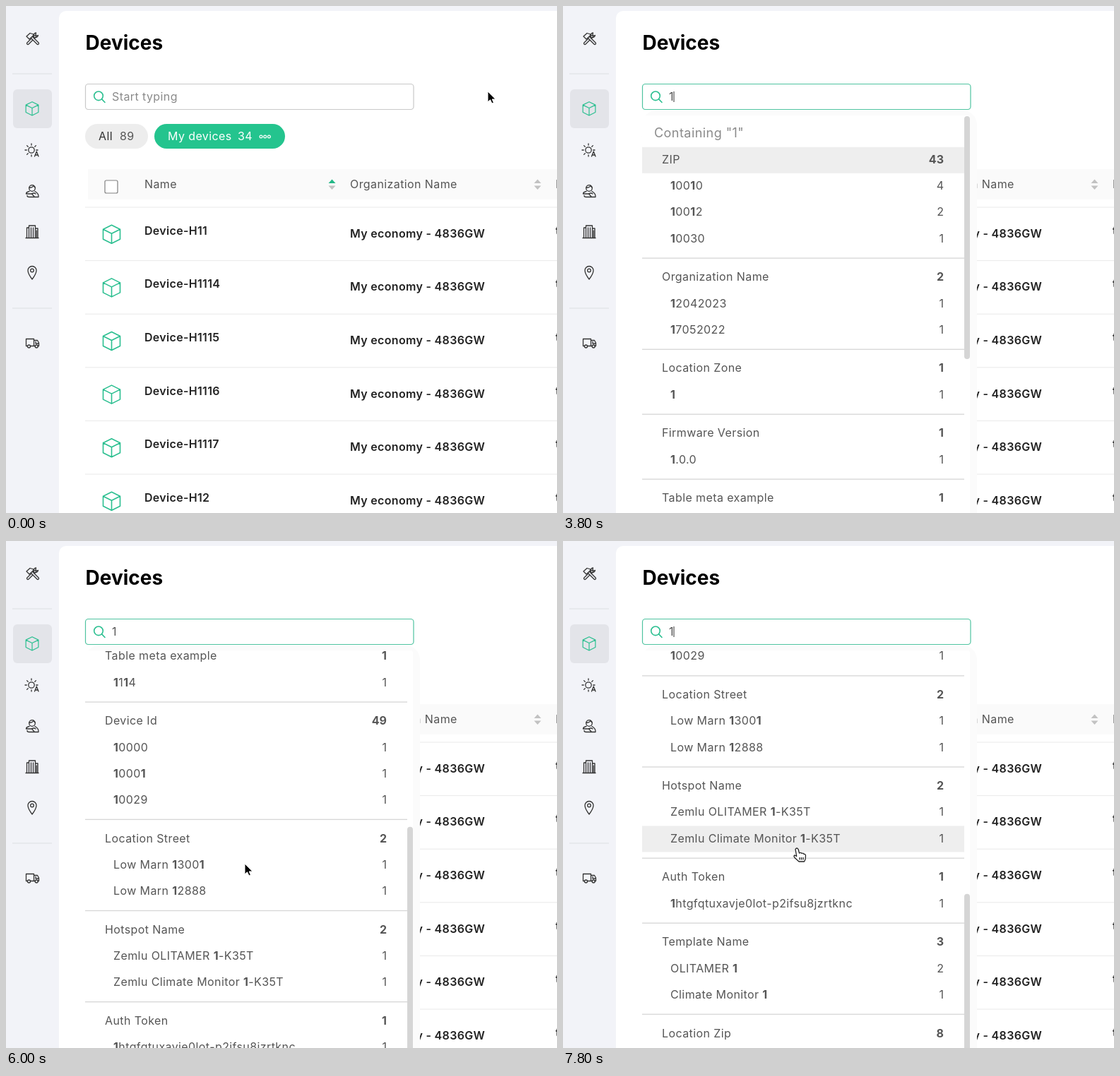
Write an HTML page that moves like this. It is 780x718 px and loops after 8 s.

```html
<!DOCTYPE html>
<html lang="en">
<head>
<meta charset="utf-8">
<title>Device search</title>
<style>
  html, body { margin: 0; width: 100%; height: 100%; overflow: hidden; background: #f2f3f8; }
  svg { display: block; }
  text { font: 16px Inter, "Open Sans", sans-serif; letter-spacing: .025em; fill: #555; }
  .title { font-size: 28px; font-weight: 700; letter-spacing: 0; fill: #000; }
  .strong { font-weight: 600; letter-spacing: .02em; fill: #222; }
  .hint { fill: #8a8a8a; }
  .caption { font-size: 18px; fill: #8a8a8a; }
  .count { text-anchor: end; letter-spacing: 0; }
  .bold { font-weight: 700; }
  .icon { fill: none; stroke: #333; stroke-width: 1.3; stroke-linejoin: round; stroke-linecap: round; }
  .green { fill: none; stroke: #2bbf90; stroke-width: 1.6; stroke-linejoin: round; stroke-linecap: round; }
</style>
</head>
<body>
<svg id="stage" width="780" height="718" viewBox="0 0 780 718"></svg>
<script>
const LOOP = 8000, STEP = 200;
const ROW = 37.2, SECTION_GAP = 54.74, FIRST_ROW = 217.3;
const PANEL_TOP = 155, THUMB_RATIO = 0.466;
const TYPED_AT = 3400, PANEL_AT = 3800;

// Square brackets mark the matched characters.
const results = [
  ['ZIP', 43, ['[1]00[1]0', 4], ['[1]00[1]2', 2], ['[1]0030', 1]],
  ['Organization Name', 2, ['[1]2042023', 1], ['[1]7052022', 1]],
  ['Location Zone', 1, ['[1]', 1]],
  ['Firmware Version', 1, ['[1].0.0', 1]],
  ['Table meta example', 1, ['[1]1[1]4', 1]],
  ['Device Id', 49, ['[1]0000', 1], ['[1]000[1]', 1], ['[1]0029', 1]],
  ['Location Street', 2, ['Low Marn [1]300[1]', 1], ['Low Marn [1]2888', 1]],
  ['Hotspot Name', 2, ['Zemlu OLITAMER [1]-K35T', 1], ['Zemlu Climate Monitor [1]-K35T', 1]],
  ['Auth Token', 1, ['[1]htgfqtuxavje0lot-p2ifsu8jzrtknc', 1]],
  ['Template Name', 3, ['OLITAMER [1]', 2], ['Climate Monitor [1]', 1]],
  ['Location Zip', 8],
];
const devices = ['H11', 'H1114', 'H1115', 'H1116', 'H1117', 'H12'];

// Times followed by values; linear between neighbours.
const scrollKeys = [[4800, 0], [5000, 35], [5200, 112], [5600, 302.5], [6000, 534], [6200, 580],
  [6400, 604], [6600, 613], [6800, 615.5], [7200, 615.5], [7400, 672], [7600, 737.5]];
const pointerKeys = [[600, 682, 121], [800, 660, 126], [1000, 540, 133], [1200, 400, 139],
  [1400, 322, 136], [1600, 314, 132], [2000, 314, 132], [2200, 314, 133], [4000, 314, 133],
  [4200, 318, 190], [4400, 328, 330], [4600, 336, 432], [4800, 338, 457], [7000, 338, 457], [7400, 332, 434]];

function sample(keys, t) {
  const next = keys.findIndex(key => key[0] > t);
  if (next === 0) return keys[0].slice(1);
  if (next < 0) return keys.at(-1).slice(1);
  const a = keys[next - 1], b = keys[next], k = (t - a[0]) / (b[0] - a[0]);
  return a.slice(1).map((value, i) => value + (b[i + 1] - value) * k);
}

// Text is placed by the vertical middle of its capitals.
const label = (x, middle, text, cls = '', extra = '') =>
  `<text x="${x}" y="${middle + 5.7}" class="${cls}" ${extra}>${text}</text>`;
const box = (x, y, w, h, fill, r = 0, extra = '') =>
  `<rect x="${x}" y="${y}" width="${w}" height="${h}" rx="${r}" fill="${fill}" ${extra}/>`;
const cube = (x, y, s) =>
  `<path d="M0-13 12-7V7L0 13-12 7V-7ZM-12-7 0-1 12-7M0-1V13" class="green" transform="translate(${x} ${y}) scale(${s})"/>`;
const sorter = (x, up) =>
  `<path d="M${x - 5} 251l5-5.5 5 5.5z" fill="${up}"/><path d="M${x - 5} 254.5l5 5.5 5-5.5z" fill="#c2c2c2"/>`;

function sidebar() {
  const rays = [0, 90, 135, 180, 225, 270, 315].map(a =>
    `<path d="M6.8 0H9" transform="translate(36 204) rotate(${a})"/>`).join('');
  return box(9, 95.5, 56, 1, '#dddfe4') + box(9, 427.5, 56, 1, '#dddfe4') +
    box(10, 118, 55, 55, '#e3e4e9', 6) + cube(37, 145.3, 0.74) +
    `<g class="icon">
      <path d="M31 53 41 43" stroke-width="4.2"/><path d="M31 53 41 43" stroke="#f2f3f8" stroke-width="1.7"/>
      <path d="M45.5 41.5a4 4 0 0 1-6 2.5 4 4 0 0 1 3-6l-.5 3 1.5 1.2z"/>
      <path d="M37 45 45 53" stroke-width="4.2"/><path d="M37 45 45 53" stroke="#f2f3f8" stroke-width="1.7"/>
      <path d="M29 43 34 38.5 39 40 38 42.5 33 47Z" fill="#f2f3f8"/>
      <circle cx="36" cy="204" r="4.2"/>${rays}
      <path d="M40.5 213 43.3 206 46 213M41.5 211H45"/>
      <circle cx="37" cy="258" r="4.3"/><path d="M33 257q4 1 6-2.5 1 2 2.2 2.5"/>
      <path d="M33 262.5q-4.5 1-4.5 3.5h8l4 4.5h5.5q.5-5-5-8M30 268.5q0 2 2.5 2H40.5M36.5 266q3-2 5.5 0"/>
      <path d="M28 328.5H46M29.5 328V314H32.5M32.5 328V311H41.5V328M41.5 315H45V328M35.5 314V328M38.5 314V328M43.3 318V328"/>
      <path d="M37 387Q31 379 31 374.5a6 6 0 0 1 12 0Q43 379 37 387Z"/><circle cx="37" cy="374.5" r="2.3"/>
      <path d="M30.5 481.5H28.5V471.5H39.5V481.5H34.5M39.5 473.5H44.5L46.5 477V481.5H45M41.5 481.5H39.5M42 475.5V478H46"/>
      <circle cx="32.5" cy="482" r="2"/><circle cx="43.2" cy="482" r="2"/>
    </g>`;
}

function table() {
  const rows = devices.map((name, i) => {
    const y = 285 + 75.6 * i;
    return box(112, y - 0.5, 668, 1, '#e9e9e9') + cube(149.5, y + 38.3, 1) +
      label(196, y + 33, `Device-${name}`, 'strong') +
      label(487, y + 37, 'My economy - 4836GW', 'strong') + label(778, y + 33, 't', 'strong');
  });
  return box(116, 231, 664, 43, '#fafafa') +
    box(140, 247, 18, 18, '#fff', 2, 'stroke="#808080" stroke-width="1.2"') +
    label(196, 252, 'Name') + sorter(461.5, '#24b887') +
    label(487, 252, 'Organization Name') + sorter(752.5, '#c2c2c2') + label(778, 252, 'L') + rows.join('');
}

function pills() {
  const dots = [361, 366.7, 372.4].map(x =>
    `<circle cx="${x}" cy="185" r="1.9" fill="none" stroke="#fff" stroke-width="1.2"/>`).join('');
  return box(112, 167, 89, 35, '#ededed', 17.5) + label(131, 184, 'All', '', 'style="fill:#333"') + label(161, 184, '89') +
    box(210, 167, 185, 35, '#24c48e', 17.5) +
    label(229, 184, 'My devices', '', 'style="fill:#fff"') + label(328, 184, '34', '', 'style="fill:#fff"') + dots;
}

const rowCenters = [];
function resultList() {
  let y = FIRST_ROW, markup = label(129, 180, 'Containing "1"', 'caption');
  results.forEach(([heading, total, ...items], i) => {
    if (i) markup += box(112, y - 27.2, 456, 1.3, '#d6d6d6');
    markup += label(140, y, heading) + label(539, y, total, 'count bold');
    rowCenters.push(y);
    for (const [text, count] of items) {
      y += ROW;
      rowCenters.push(y);
      const marked = text.replace(/\[(.)\]/g, '<tspan class="bold">$1</tspan>');
      markup += label(152, y, marked) + label(539, y, count, 'count');
    }
    y += SECTION_GAP;
  });
  return markup;
}

const highlight = (id, y) => box(112, y - 17.5, 456, 37, '#eee', 0, `id="${id}"`);

stage.innerHTML = `
  <clipPath id="view"><rect x="112" y="${PANEL_TOP}" width="464" height="563"/></clipPath>
  <rect width="780" height="718" fill="#f2f3f8"/>
  ${sidebar()}
  ${box(75, 7, 730, 740, '#fff', 10)}
  <text x="112.5" y="62" class="title">Devices</text>
  ${box(112.5, 110.5, 464.5, 36, '#fff', 4, 'id="field" stroke-width="1.2"')}
  <g class="green"><circle cx="131" cy="127.3" r="6.3"/><path d="M135.6 131.9 140 136.5"/></g>
  ${label(150, 128, 'Start typing', 'hint', 'id="hint"')}
  ${label(150, 128, '1', '', 'id="typed"')}
  ${box(0, 121, 1, 15, '#333', 0, 'id="caret"')}
  ${pills()}
  ${table()}
  <g id="panel">
    ${box(112, 148, 474, 600, '#fbfbfb', 20)}
    ${box(112, PANEL_TOP, 464, 600, '#fff', 3)}
    <g clip-path="url(#view)">
      <g id="list">${highlight('active', FIRST_ROW)}${highlight('hovered', 0)}${resultList()}</g>
    </g>
    ${box(568, 0, 8, 344, '#d5d5d5', 4, 'id="thumb"')}
  </g>
  <g id="pointer">
    <path id="arrow" d="M0 0V15L3.5 11.8 6 17 8.4 16 6.2 11H11Z" fill="#000" stroke="#fff"/>
    <g id="beam" fill="none" stroke-linecap="round">
      ${['#fff', '#111'].map((color, i) =>
        `<path d="M-3.5-9Q-.5-9 0-7 .5-9 3.5-9M0-7V7M-3.5 9Q-.5 9 0 7 .5 9 3.5 9M-1.5 2.5H1.5" stroke="${color}" stroke-width="${3 - 1.6 * i}"/>`).join('')}
    </g>
    <path id="hand" d="M-3 2.5Q-1-.5 1 2.5L2.5 8Q5 6.5 6 8.5 8.5 7.5 9 9.5 11.5 9 11.5 12L11 17 9.5 20H2L-4 14.5Q-6 11.5-4 11L-1.3 12.5ZM3 14V17.5M5.5 14V17.5M8 14V17.5"
      fill="#fff" stroke="#222" stroke-width="1.3" stroke-linejoin="round"/>
  </g>`;

const part = id => document.getElementById(id);
const show = (id, visible) => part(id).setAttribute('visibility', visible ? 'inherit' : 'hidden');

function draw(t) {
  const [scroll] = sample(scrollKeys, t);
  const [x, y] = sample(pointerKeys, t);
  const typed = t >= TYPED_AT, open = t >= PANEL_AT;
  const scrolling = scroll - sample(scrollKeys, t - STEP)[0] > 1;
  const overField = x < 577 && y > 110 && y < 147;
  const row = open && !scrolling && y > PANEL_TOP &&
    rowCenters.find(center => Math.abs(y + scroll - center - 1) < 18.5);

  part('field').setAttribute('stroke', overField || t > 1400 ? '#4fc3a0' : '#c9c9c9');
  show('hint', !typed);
  show('typed', typed);
  const blinkOn = Math.floor((t - TYPED_AT) / 500) % 2 === 0;
  show('caret', t >= 2500 && blinkOn);
  part('caret').setAttribute('x', typed ? 156.5 : 150.5);

  show('panel', open);
  part('list').setAttribute('transform', `translate(0 ${-scroll})`);
  part('thumb').setAttribute('y', 156 + scroll * THUMB_RATIO);
  show('hovered', row);
  if (row) part('hovered').setAttribute('y', row - 17.5);

  show('pointer', t < TYPED_AT || t >= 4200);
  part('pointer').setAttribute('transform', `translate(${x} ${y})`);
  show('beam', overField);
  show('hand', row);
  show('arrow', !overField && !row);
}

function tick() {
  const t = performance.now() % LOOP;
  draw(Math.floor(t / STEP) * STEP);
  requestAnimationFrame(tick);
}
tick();
</script>
</body>
</html>
```
